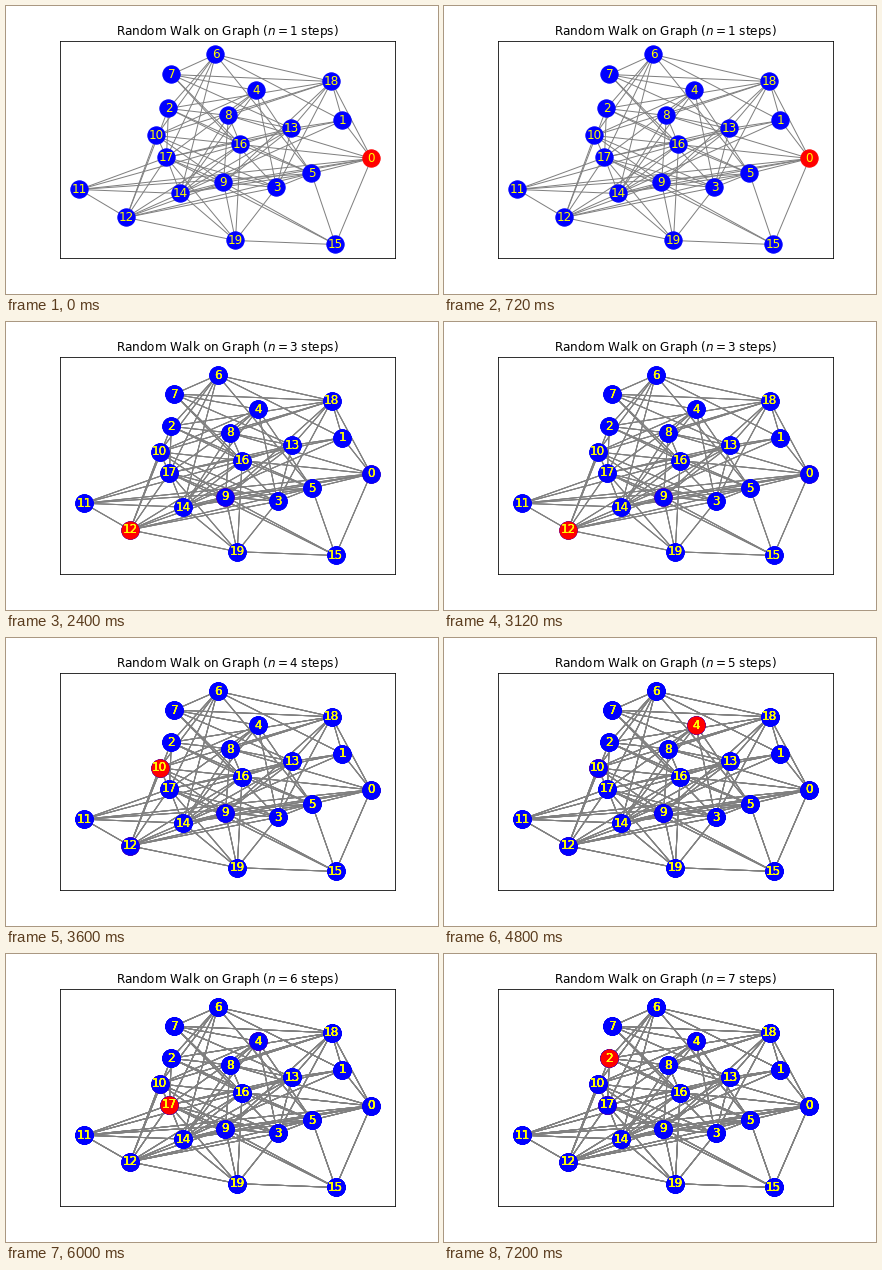
A matplotlib script for the animation above (8 s loop, 432 px wide and 288 px high).

```python
import random
from itertools import combinations, pairwise

import numpy as np
import matplotlib.pyplot as plt
from matplotlib.animation import FuncAnimation
from matplotlib.collections import LineCollection

DPI = 72
STEP_MS, TICK_MS, LOOP_MS = 1200, 400, 8000
NODE_SIZE = 300
MARGIN = 0.05
LINK_CHANCE = 0.42

# Node centres as pixel indices, y pointing down; 0.5 moves to pixel middles
POS = 0.5 + np.array([
    (365, 152), (336, 114), (162, 102), (270, 181), (250, 84),
    (305, 167), (209, 48), (165, 68), (222, 109), (217, 176),
    (150, 129), (73, 183), (120, 211), (285, 122), (174, 187),
    (329, 238), (234, 138), (160, 151), (325, 75), (229, 234),
])
WALK = [0, 9, 12, 10, 4, 17, 2]

# Trails that tie the sparse outer nodes to the rest
RIM = {0, 11, 12, 15, 19}
TRAILS = [
    WALK,
    [11, 12, 19, 15, 0, 18, 6, 7, 18, 1, 0, 5, 11, 14, 12, 2],
    [11, 0, 16, 11, 17, 15, 5, 12, 16, 19, 9, 15],
    [8, 0, 14, 19, 3, 12, 17, 19],
]

plt.rcParams["font.family"] = "DejaVu Sans"
fig, ax = plt.subplots(figsize=(432 / DPI, 288 / DPI), dpi=DPI)
fig.subplots_adjust(left=0.125, right=0.9, bottom=0.125, top=0.88)
ax.set_xticks([])
ax.set_yticks([])


def make_links():
    """Join the trails with a seeded random graph of the inner nodes."""
    rng = random.Random(20)
    links = {tuple(sorted(p)) for trail in TRAILS for p in pairwise(trail)}
    inner = [i for i in range(len(POS)) if i not in RIM]
    links |= {p for p in combinations(inner, 2) if rng.random() < LINK_CHANCE}
    return sorted(links)


def make_layer(links, current):
    """Draw the whole graph once, with the current node in red."""
    edges = LineCollection([POS[list(p)] for p in links], colors="gray",
                           linewidths=1, zorder=1)
    ax.add_collection(edges)
    others = np.delete(POS, current, axis=0)
    nodes = [
        ax.scatter(*points.T, s=NODE_SIZE, c=color, linewidths=1, zorder=2)
        for points, color in ((others, "blue"), (POS[[current]], "red"))
    ]
    labels = [
        ax.text(x, y, str(i), color="yellow", size=12, ha="center",
                va="center", clip_on=True, zorder=3)
        for i, (x, y) in enumerate(POS)
    ]
    return [edges, *nodes, *labels]


def make_views(count):
    """Autoscale limits, refitted around the markers after every redraw."""
    size = np.array([334.8, 217.44])
    low = np.array([54, 34.56])
    high = low + size
    radius = np.sqrt(NODE_SIZE) / 2
    views = [(low, high)]
    for _ in range(count - 1):
        reach = radius * (high - low) / size
        near, far = POS.min(axis=0) - reach, POS.max(axis=0) + reach
        pad = MARGIN * (far - near)
        low, high = near - pad, far + pad
        views.append((low, high))
    return views


links = make_links()
layers = [make_layer(links, node) for node in WALK]
views = make_views(len(WALK))


def update(tick):
    step = tick * TICK_MS // STEP_MS
    # Earlier drawings stay underneath, so lines and labels grow heavier
    for i, layer in enumerate(layers):
        for artist in layer:
            artist.set_visible(i <= step)
    low, high = views[step]
    ax.set_xlim(low[0], high[0])
    ax.set_ylim(high[1], low[1])
    ax.set_title(f"Random Walk on Graph ($n={step + 1}$ steps)", fontsize=12)


anim = FuncAnimation(fig, update, frames=LOOP_MS // TICK_MS,
                     interval=TICK_MS, repeat=True, repeat_delay=0)
plt.show()
```
